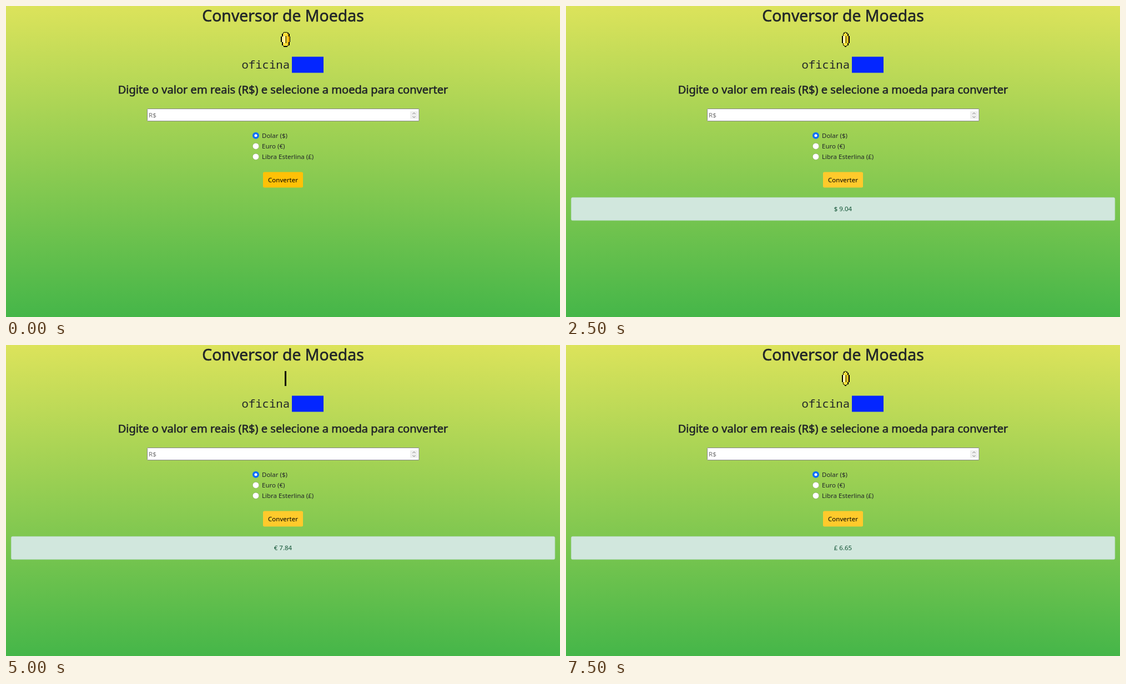
These frames come from a looping animation (998x561 px, 8.75 s). An HTML page:

```html
<!DOCTYPE html>
<html lang="pt-BR">
<head>
<meta charset="utf-8">
<title>Conversor de Moedas</title>
<style>
  html, body { margin: 0; width: 100%; height: 100%; overflow: hidden; }
  svg { display: block; width: 998px; height: 561px; }
  text { font: 11.5px "Noto Sans", "Open Sans", sans-serif; fill: #212529; }
  .mid { text-anchor: middle; }
  .head { stroke: #212529; stroke-width: .6px; }
  .title { font-size: 28.4px; }
  .sub { font-size: 20.1px; }
  .mono { font: 300 20.6px "Noto Sans Mono", monospace; }
</style>
</head>
<body>
<svg viewBox="0 0 998 561">
  <defs>
    <linearGradient id="sky" x2="0" y2="1">
      <stop stop-color="#dce35b"/><stop offset="1" stop-color="#45b649"/>
    </linearGradient>
  </defs>
  <rect width="998" height="561" fill="url(#sky)"/>
  <text class="mid head title" x="499" y="28">Conversor de Moedas</text>
  <g id="coin" transform="translate(503.8 46.7) scale(1.7)" shape-rendering="crispEdges"></g>
  <text class="mono" x="424.5" y="113">oficina</text>
  <rect x="515" y="91.5" width="57" height="29" fill="#0426ff"/>
  <text class="mid head sub" x="499" y="158">Digite o valor em reais (R$) e selecione a moeda para converter</text>

  <rect id="glow" x="252.5" y="183.5" width="493" height="26" rx="2.5" fill="#cdeedd"/>
  <rect id="field" x="254.5" y="185.5" width="489.5" height="22" rx="1" fill="#fff"/>
  <rect x="728" y="190" width="14" height="13.5" fill="#efefef"/>
  <path d="M732.5 195l2.5-2.5 2.5 2.5M732.5 199l2.5 2.5 2.5-2.5" fill="none" stroke="#777"/>
  <text id="value" x="257" y="201"></text>
  <path id="caret" d="M270.7 190v13" stroke="#000"/>

  <g id="radios"></g>
  <rect id="button" x="463" y="299.5" width="72" height="28" rx="2.5"/>
  <text class="mid" x="499" y="318" style="fill:#000">Converter</text>
  <g id="alert">
    <rect x="9.4" y="345.4" width="979.4" height="41.4" rx="2.5" fill="#d1e7dd" stroke="#badbcc" stroke-width=".7"/>
    <text class="mid" id="result" x="499" y="370" style="fill:#0f5132"></text>
  </g>
</svg>
<script>
const $ = id => document.getElementById(id);
const show = (id, on) => $(id).style.display = on ? '' : 'none';
const STEP = 1250;
const currencies = ['Dolar ($)', 'Euro (€)', 'Libra Esterlina (£)'];
// coin: half width of the spinning coin, in sprite pixels
const steps = [
  { coin: 5, idle: true },
  { coin: 3, value: '50', focus: true },
  { coin: 4, result: '$ 9.04' },
  { coin: 6, value: '50', pick: 1 },
  { coin: 1, result: '€ 7.84' },
  { coin: 3, value: '50', pick: 2, ring: true },
  { coin: 4, result: '£ 6.65' },
];

function coinPixels(w) {
  const half = y => y < 0 || y > 15 ? 0 :
    w === 1 ? 1 : Math.max(1, Math.round(w * Math.sqrt(1 - ((y - 7.5) / 8) ** 2)));
  const inside = (x, y) => x >= -half(y) && x < half(y);
  const slot = w > 5 ? 1 : 0;
  const color = (x, y) => {
    const edge = !(inside(x - 1, y) && inside(x + 1, y) && inside(x, y - 1) && inside(x, y + 1));
    if (edge) return '#000';
    if (w > 3 && y > 3 && y < 12) {
      if (x === slot) return '#000';
      if (x === slot - 2) return '#fffbe0';
    }
    return x < 2 - w ? '#fff59a' : x < w / 3 ? '#ffe03a' : '#f0ae00';
  };
  let out = '';
  for (let y = 0; y < 16; y++)
    for (let x = -half(y); x < half(y); x++)
      out += `<rect x="${x}" y="${y}" width="1" height="1" fill="${color(x, y)}"/>`;
  return out;
}

function radio(label, i, picked, ring) {
  const y = 233.8 + 19 * i;
  const dot = picked
    ? `<circle cx="450" cy="${y}" r="6" fill="#0d6efd"/><circle cx="450" cy="${y}" r="2.5" fill="#fff"/>`
    : `<circle cx="450" cy="${y}" r="5.6" fill="#fff" stroke="#000" stroke-opacity=".25" stroke-width=".7"/>`;
  const halo = picked && ring ? `<circle cx="450" cy="${y}" r="8" fill="#0d6efd" opacity=".3"/>` : '';
  return `${halo}${dot}<text x="461" y="${y + 4.2}">${label}</text>`;
}

function render({ coin, value, focus, pick = 0, ring, result, idle }) {
  $('coin').innerHTML = coinPixels(coin);
  $('value').textContent = value || 'R$';
  $('value').style.fill = value ? '#000' : '#757575';
  $('field').setAttribute('stroke', focus ? '#5fa5a0' : '#858585');
  show('glow', focus);
  show('caret', focus);
  $('radios').innerHTML = currencies.map((c, i) => radio(c, i, i === pick, ring)).join('');
  $('button').setAttribute('fill', idle ? '#ffc107' : '#ffca2c');
  show('alert', result);
  $('result').textContent = result || '';
}

let current = -1;
function tick() {
  const i = Math.floor(performance.now() / STEP) % steps.length;
  if (i !== current) render(steps[current = i]);
  requestAnimationFrame(tick);
}
tick();
</script>
</body>
</html>
```
